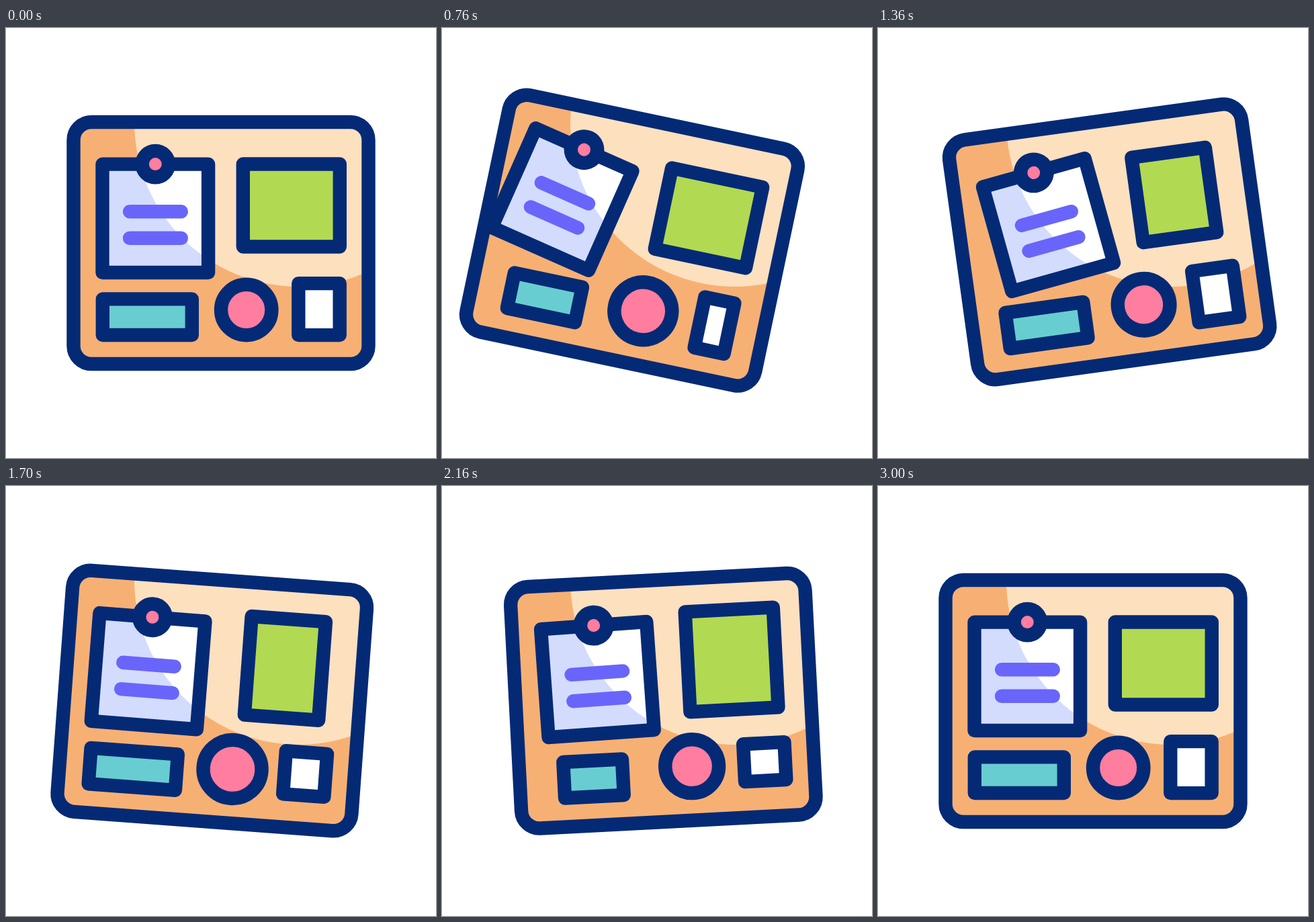
Animation, 640 px wide and 640 px high, one loop 3220 ms. Source, as an HTML page with a canvas:

```html
<!DOCTYPE html>
<html lang="en">
<head>
<meta charset="utf-8">
<title>Swinging pin board</title>
<style>
  html, body { margin: 0; width: 100%; height: 100%; overflow: hidden; background: #fff; }
  canvas { display: block; width: 640px; height: 640px; }
</style>
</head>
<body>
<canvas id="stage" width="640" height="640"></canvas>
<script>
const ctx = document.getElementById('stage').getContext('2d');
const LOOP = 3220, STEP = 20, LINE = 20.4;
const NAVY = '#042a76', ORANGE = '#f7b074', CREAM = '#fde0be', SHADE = '#d3dcfd',
      PURPLE = '#6a65fa', GREEN = '#b2d952', TEAL = '#68cdd0', PINK = '#ff7d9f';

// Symmetric cubic Bezier easing with handles (a, 0) and (1 - a, 1).
function bezier(a) {
  return x => {
    let lo = 0, hi = 1, s = x;
    for (let i = 0; i < 24; i++) {
      s = (lo + hi) / 2;
      const u = 1 - s;
      const bx = 3 * s * u * u * a + 3 * s * s * u * (1 - a) + s * s * s;
      if (bx < x) lo = s; else hi = s;
    }
    return s * s * (3 - 2 * s);
  };
}
const soft = x => x * x * (3 - 2 * x);
const sharp = bezier(0.6);

// Value at time t of a list of [time, value] keys.
function track(t, ease, keys) {
  if (t <= keys[0][0]) return keys[0][1];
  for (let i = 1; i < keys.length; i++) {
    const [t0, v0] = keys[i - 1], [t1, v1] = keys[i];
    if (t < t1) return v0 + (v1 - v0) * ease((t - t0) / (t1 - t0));
  }
  return keys[keys.length - 1][1];
}

const SWING = [[0, 0], [620, 12], [715, 12], [1310, -8], [1810, 5], [2180, -3], [2470, 1], [2690, 0]];
const FLAP = [[0, 0], [695, 12], [790, 12], [1430, -8], [1915, 5], [2310, -3], [2610, 1], [3000, 0]];
const GREEN_W = [[600, 144], [1200, 110.6], [1815, 110.6], [2410, 144]];
const GREEN_H = [[1200, 123], [1800, 149], [2400, 149], [3000, 123]];
const TEAL_W = [[400, 133], [1000, 87.2], [1600, 133], [2200, 87.2], [2800, 133]];
const DISC_R = [[0, 37.7], [600, 44], [1200, 37.7], [1800, 44], [2400, 37.7]];
const CARD_W = [[200, 61.4], [800, 44.8], [1400, 61.4]];
const CARD_H = [[1400, 77], [2000, 51.5], [2600, 77]];

function outline(path) {
  ctx.strokeStyle = NAVY;
  ctx.lineWidth = LINE;
  ctx.stroke(path);
}

function shape(path, fill) {
  ctx.fillStyle = fill;
  ctx.fill(path);
  outline(path);
}

// Two-tone fill: the light spot stays still on the stage.
function lit(path, dark, light) {
  ctx.save();
  ctx.clip(path);
  ctx.fillStyle = dark;
  ctx.fill(path);
  ctx.setTransform(1, 0, 0, 1, 0, 0);
  ctx.fillStyle = light;
  ctx.fill(circle(436, 140, 245));
  ctx.restore();
  outline(path);
}

function box(cx, cy, w, h, r) {
  const p = new Path2D();
  if (r) p.roundRect(cx - w / 2, cy - h / 2, w, h, r);
  else p.rect(cx - w / 2, cy - h / 2, w, h);
  return p;
}

function circle(x, y, r) {
  const p = new Path2D();
  p.arc(x, y, r, 0, Math.PI * 2);
  return p;
}

function turn(x, y, deg) {
  ctx.translate(x, y);
  ctx.rotate(deg * Math.PI / 180);
  ctx.translate(-x, -y);
}

function paper(t) {
  ctx.save();
  turn(222.3, 202.6, track(t, sharp, FLAP));
  lit(box(222.3, 283.3, 157.6, 161.4), SHADE, '#fff');
  ctx.strokeStyle = PURPLE;
  for (const y of [273.3, 312.8]) {
    ctx.beginPath();
    ctx.moveTo(184, y);
    ctx.lineTo(260.8, y);
    ctx.stroke();
  }
  shape(circle(222.3, 202.6, 19.7), PINK);
  ctx.restore();
}

function draw(t) {
  const at = keys => track(t, soft, keys);
  ctx.setTransform(1, 0, 0, 1, 0, 0);
  ctx.fillStyle = '#fff';
  ctx.fillRect(0, 0, 640, 640);
  ctx.lineJoin = ctx.lineCap = 'round';

  turn(320, 140, track(t, sharp, SWING));
  lit(box(320, 320, 439, 360, 26.7), ORANGE, CREAM);
  shape(box(424.8, 264, at(GREEN_W), at(GREEN_H)), GREEN);
  shape(box(210.3, 430.2, at(TEAL_W), 53.6), TEAL);
  shape(box(466, 418.6, at(CARD_W), at(CARD_H)), '#fff');
  shape(circle(357.7, 419.5, at(DISC_R)), PINK);
  paper(t);
}

const start = performance.now();
function frame() {
  const t = (performance.now() - start) % LOOP;
  draw(Math.floor(t / STEP) * STEP);
  requestAnimationFrame(frame);
}
frame();
</script>
</body>
</html>
```
